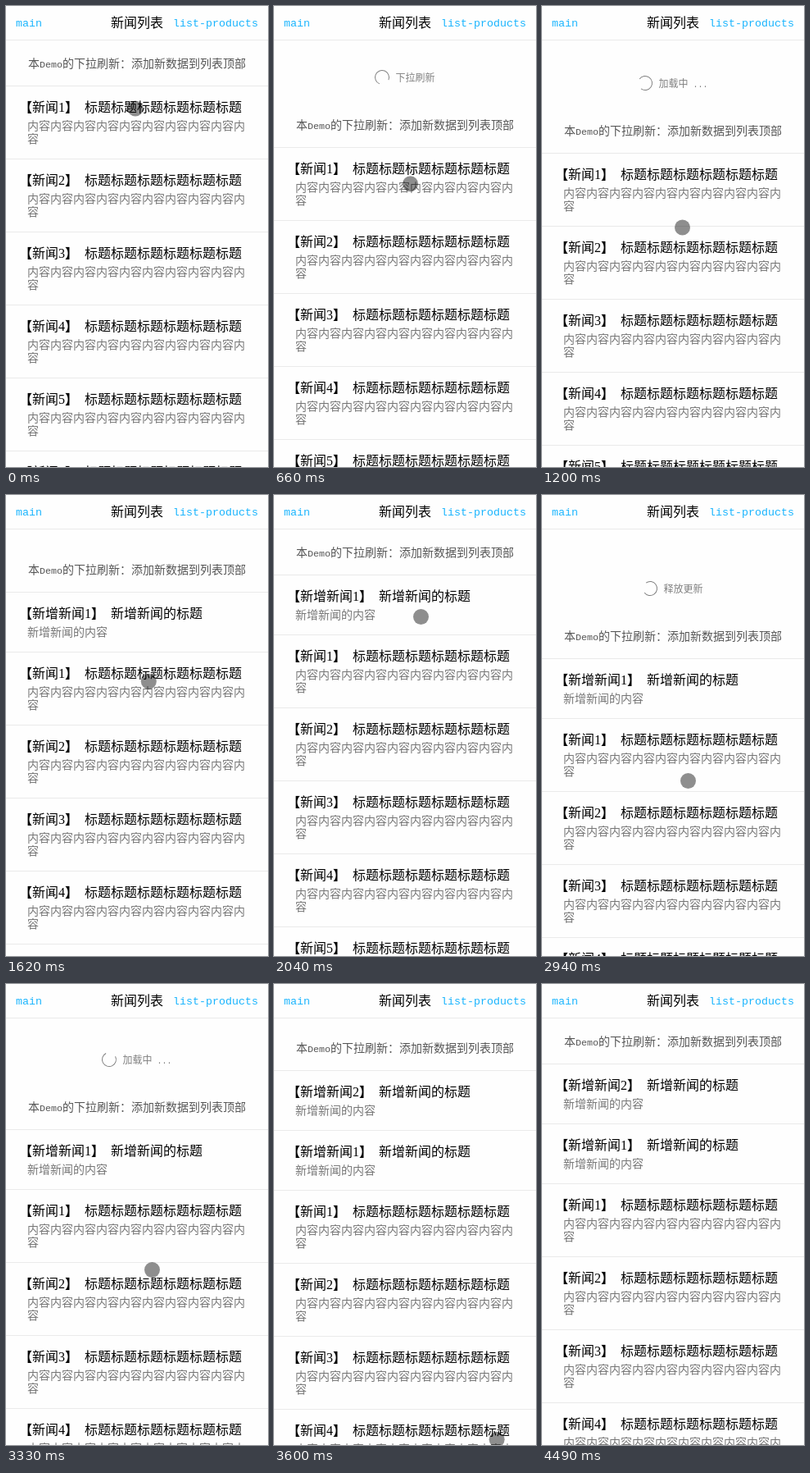
Recreate the animation shown at these times as an HTML page. Size 320 by 562 pixels, loop 4590 ms.

```html
<!DOCTYPE html>
<html lang="zh-CN">
<head>
<meta charset="utf-8">
<title>新闻列表</title>
<style>
  html, body { margin: 0; width: 100%; height: 100%; overflow: hidden; background: #fefefe; }
  svg { display: block; width: 100%; height: 100%; }
  text { font-family: "Noto Sans CJK SC", "Noto Sans CJK", sans-serif; font-weight: 300; white-space: pre; }
  .bracket { font-weight: 900; }
  .latin { font-family: "Liberation Mono", monospace; font-weight: 400; }
  .digit { font-family: "Liberation Serif", serif; font-weight: 400; }
</style>
</head>
<body>
<svg id="stage" viewBox="0 0 320 562"></svg>
<script>
const LOOP = 4590, HEADER = 42, LIST_TOP = 97;
const HOLD = 80, LOAD = 400, SETTLE = 300;
const PAPER = '#fefefe', LINE = '#eaeaea', LINK = '#18b4fe', GRAY = '#777';

// Each pull refreshes the picture at its own steady step.
const PULLS = [
  { start: 0, step: 132, grabY: 142, release: 1053 },
  { start: 2040, step: 128.5, grabY: 158, release: 2995 }
];

// Pointer strokes, each easing on from the end of the one before.
const HOME = { x: 158, y: 125 };
const STROKES = [
  { from: 100, to: 1050, x: 171.5, y: 270 },
  { from: 1320, to: 1980, x: 179.5, y: 148.5 },
  { from: 2120, to: 2910, x: 178.5, y: 348.5 },
  { from: 3382, to: 3710, x: 320, y: 661 }
];

const stage = document.getElementById('stage');
const clamp = v => Math.min(1, Math.max(0, v));
const smooth = u => u * u * (3 - 2 * u);

function add(parent, tag, attrs = {}) {
  const el = document.createElementNS('http://www.w3.org/2000/svg', tag);
  for (const key in attrs) el.setAttribute(key, attrs[key]);
  parent.appendChild(el);
  return el;
}

function styleOf(run) {
  if (/[【】]/.test(run)) return 'bracket';
  if (/\d/.test(run)) return 'digit';
  return /[ -~]/.test(run) ? 'latin' : 'han';
}

// Half-width characters take half an em, full-width ones a whole em.
function write(parent, x, centerY, size, fill, string) {
  const text = add(parent, 'text', { y: centerY + size * 0.38, fill });
  for (const run of string.match(/\d|[ -\/:-~]+|[^ -~]/g)) {
    const style = styleOf(run);
    const span = add(text, 'tspan', {
      x, class: style, 'font-size': style === 'latin' ? size / 1.2 : size
    });
    span.textContent = run;
    x += run.length * size * (/[ -~]/.test(run) ? 0.5 : 1);
  }
  return text;
}

function move(el, x, y) {
  el.setAttribute('transform', `translate(${x} ${y})`);
}

function show(el, on) {
  el.setAttribute('display', on ? 'inline' : 'none');
}

function rule(parent, y) {
  add(parent, 'rect', { y, width: 320, height: 1, fill: LINE });
}

function makeRow(title, lines) {
  const g = add(list, 'g');
  rule(g, 0);
  write(g, 16, 26, 16, '#000', title);
  lines.forEach((line, i) => write(g, 26, 48.8 + i * 16, 14, GRAY, line));
  return { g, height: 57 + lines.length * 16 };
}

add(stage, 'rect', { width: 320, height: 562, fill: PAPER });

const loader = add(stage, 'g');
const ring = add(loader, 'path', {
  d: 'M6 6A8.5 8.5 0 1 0 -6 6', fill: 'none', stroke: '#808080'
});
const labels = ['下拉刷新', '释放更新', '加载中 ...'].map(s => write(loader, 16.5, 0, 12, '#808080', s));

const list = add(stage, 'g');
write(list, 27, 69.5, 14, '#555', '本Demo的下拉刷新：添加新数据到列表顶部');
const added = [1, 2].map(n => makeRow(`【新增新闻${n}】 新增新闻的标题`, ['新增新闻的内容']));
const news = [1, 2, 3, 4, 5, 6].map(n =>
  makeRow(`【新闻${n}】 ${'标题'.repeat(6)}`, ['内容'.repeat(9) + '内', '容']));

add(stage, 'rect', { width: 320, height: HEADER, fill: PAPER });
rule(stage, HEADER - 1);
write(stage, 12, 19, 16, LINK, 'main');
write(stage, 128, 19.5, 16, '#000', '新闻列表');
write(stage, 204, 18.5, 16, LINK, 'list-products');

const bar = add(stage, 'rect', { x: 312, y: HEADER, width: 6, height: 237, fill: '#808080' });
const pointer = add(stage, 'circle', { r: 9.5, fill: '#000', 'fill-opacity': 0.44 });

// Close to the CSS "ease" curve: its bezier, solved for time by bisection.
function ease(p) {
  const bez = (a, b, s) => 3 * a * s * (1 - s) ** 2 + 3 * b * s * s * (1 - s) + s ** 3;
  let lo = 0, hi = 1;
  for (let i = 0; i < 24; i++) {
    const mid = (lo + hi) / 2;
    if (bez(0.25, 0.25, mid) < clamp(p)) lo = mid; else hi = mid;
  }
  return bez(0.1, 1, lo);
}

function pointerAt(t) {
  return STROKES.reduce((p, s) => {
    const k = smooth(clamp((t - s.from) / (s.to - s.from)));
    return { x: p.x + (s.x - p.x) * k, y: p.y + (s.y - p.y) * k };
  }, HOME);
}

// Follows the finger up to the hold height, then resists.
function stretch(pull, t) {
  const drag = Math.max(0, pointerAt(t).y - pull.grabY);
  return drag < HOLD ? drag : HOLD + (drag - HOLD) * 0.2;
}

function offsetAt(pull, t) {
  const since = t - pull.release;
  if (since < 0) return stretch(pull, t);
  if (since >= LOAD) return HOLD * (1 - ease((since - LOAD) / SETTLE));
  const top = stretch(pull, pull.release);
  return top + (HOLD - top) * ease(since / SETTLE);
}

function draw(t, pull) {
  const offset = offsetAt(pull, t);
  const loading = t >= pull.release;
  const shift = Math.round(offset);

  move(list, 0, shift);
  let y = LIST_TOP;
  for (const row of [added[1], added[0], ...news]) {
    const n = added.indexOf(row);
    const on = n < 0 || t >= PULLS[n].release + LOAD;
    show(row.g, on);
    if (!on) continue;
    move(row.g, 0, y);
    y += row.height;
  }

  move(loader, loading ? 126 : 132, shift + 12);
  show(loader, offset > 20);
  const turn = loading ? (t - pull.release) / 600 : offset / HOLD;
  ring.setAttribute('transform', `rotate(${turn * 360})`);
  const state = loading ? 2 : offset >= HOLD ? 1 : 0;
  labels.forEach((label, i) => show(label, i === state));

  const tip = pointerAt(t);
  move(pointer, tip.x, tip.y);

  // The scrollbar appears once the last pull has settled, then fades.
  const settled = t > PULLS[1].release + LOAD + SETTLE;
  bar.setAttribute('opacity', settled ? 0.5 * clamp((4480 - t) / 360) : 0);
}

const begin = performance.now();
function frame() {
  const t = (performance.now() - begin) % LOOP;
  const pull = PULLS.filter(p => p.start <= t).pop();
  draw(pull.start + Math.floor((t - pull.start) / pull.step) * pull.step, pull);
  requestAnimationFrame(frame);
}
frame();
</script>
</body>
</html>
```
